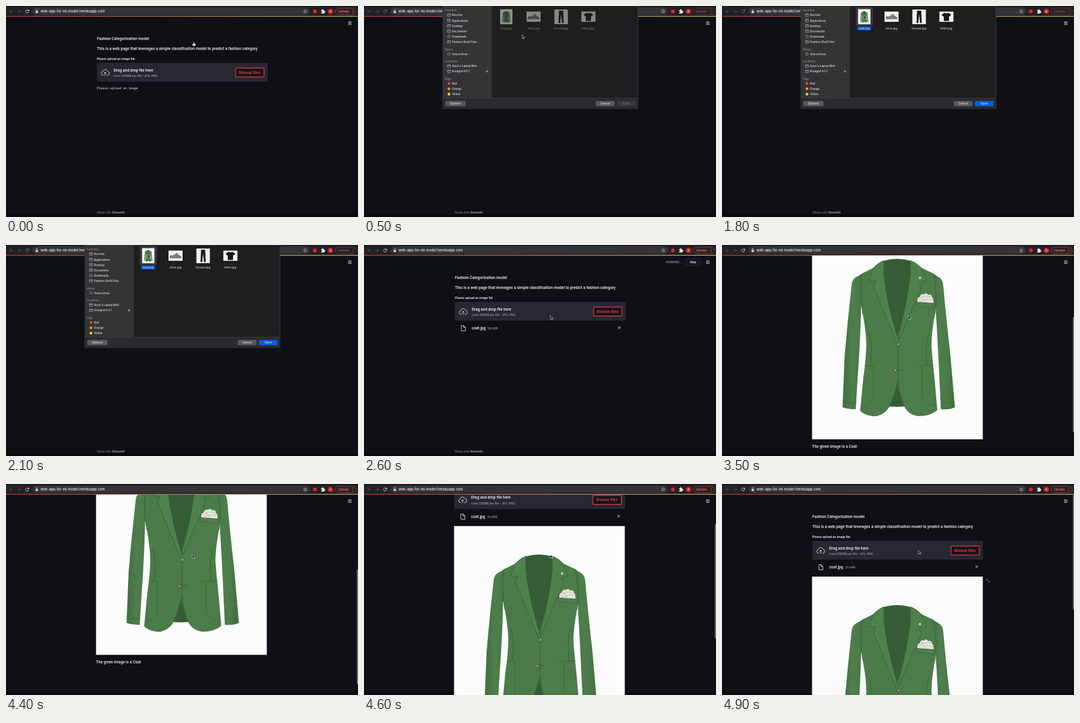
Animation, 600 px wide and 360 px high, one loop 5 s. Source, as an HTML page:

```html
<!DOCTYPE html>
<html lang="en">
<head>
<meta charset="utf-8">
<title>Fashion Categorization model</title>
<style>
html, body { margin: 0; width: 100%; height: 100%; overflow: hidden; background: #0e1016; }
svg { display: block; width: 600px; height: 360px; }
text { fill: #f6f6f8; font: 500 6.65px Roboto, "Liberation Sans", sans-serif; white-space: pre; }
.small { font-size: 5.25px; }
.grey { fill: #8f9097; }
.ui text { font: 500 4.6px Inter, sans-serif; fill: #e6e6e8; }
.ui .head { fill: #8d8d90; }
.ui .name { font-size: 5px; font-weight: 400; text-anchor: middle; }
.ui .mid { text-anchor: middle; font-size: 5px; }
.line { fill: none; stroke: #dedee2; stroke-width: .9; }
.seam { fill: none; stroke: #2f5632; stroke-width: .7; }
.stitch { fill: none; stroke: #2d5430; stroke-width: .8; stroke-dasharray: 1.2 .9; }
</style>
</head>
<body>
<svg viewBox="0 0 600 360">
<defs>
  <linearGradient id="rule"><stop stop-color="#c23c40"/><stop offset="1" stop-color="#c4b866"/></linearGradient>
  <linearGradient id="cloth"><stop stop-color="#416e40"/><stop offset=".4" stop-color="#4d7e4b"/><stop offset=".7" stop-color="#4a7b48"/><stop offset="1" stop-color="#406c3f"/></linearGradient>
  <g id="coat">
    <path fill="#fdfcfd" d="M153.500-25h291v356.500h-291z"/>
    <path fill="#365c38" d="M275 27Q298 20 322 27L328 70 308 150 313 275Q298 277 282 275L290 150 272 60z"/>
    <path class="seam" d="M302 33V150M301 236V274M276 32Q298 27 321 32"/>
    <path fill="url(#cloth)" d="M242 47L227 56Q222 59 221 68Q214 130 209 190L205.500 277Q216 281 228 280L231 230Q236 160 237 105L246 80z"/>
    <path fill="url(#cloth)" d="M357 47L371 56Q376 59 377 68Q382 125 389 185L397 277Q386 282 373 280L370 215Q367 150 364 105L354 80z"/>
    <path fill="#4a7b48" d="M276 26Q266 30 258 39L238 49Q234 90 240 118Q246 150 246 172Q245 200 241 225L235.500 283Q246 293 264 292Q279 288 286 275Q294 257 300 230V162Q279 95 276 50z"/>
    <path fill="#4b7c49" d="M321 26Q332 30 340 39L361 49Q367 90 363 118Q357 150 357 172Q359 200 362 225L367 282Q355 292 335 292Q318 290 311 276Q303 260 298 230V162Q317 95 321 50z"/>
    <path fill="#4f814c" d="M276 26Q266 30 259 38L250 60 262 61 258 70 297 165 300 160Q280 95 276 50z"/>
    <path fill="#4e804b" d="M321 26Q332 30 339 39L348 61 336 63 340 72 300 165 298 159Q317 95 321 50z"/>
    <path class="seam" d="M259 38L250 60 262 61 258 70 297 165M339 39L348 61 336 63 340 72 300 165M276 27V50Q280 95 300 161M321 27V50Q317 95 299 161M300 165V230Q294 257 286 275M300 230Q303 260 311 276M238 50Q234 88 240 118M361 50Q367 88 363 118M250 148Q258 180 252 206M352 148Q345 180 350 206"/>
    <path class="stitch" d="M243 206H258V255Q258 272 238 274M361 205L330 206M341 207V255Q342 272 365 274M227 56Q236 54 241 48M372 57Q363 54 358 48M206 268L228 271M373 271L396 268M331 98L361 106"/>
    <path fill="#507f4c" stroke="#31573a" stroke-width=".5" d="M331 97L361 100V107.500L331 103z"/>
    <path fill="#e6e5de" d="M333 97Q332 89 337 89Q338 83 344 84Q349 80 351 85Q357 83 358 89Q361 92 360.500 99z"/>
    <path fill="none" stroke="#8d9184" stroke-width="1" stroke-dasharray="1.400 1.300" d="M335 94Q345 85 357 89M338 97Q348 90 359 94M340 88l9 10"/>
    <circle cx="337.500" cy="56" r="1.8" fill="#e6e6e4"/>
    <g fill="#99968f" stroke="#3b3f3a" stroke-width=".9"><circle cx="301" cy="169.300" r="2.600"/><circle cx="295.500" cy="213.800" r="2.500"/></g>
    <path class="seam" d="M299 213h10"/>
  </g>
</defs>

<rect width="600" height="360" fill="#0e1016"/>
<rect y="356" width="600" height="4" fill="#090a0e"/>

<g id="page">
  <text x="155" y="58.200">Fashion Categorization model</text>
  <text x="155" y="75.200">This is a web page that leverages a simple classification model to predict a fashion category</text>
  <text class="small" x="155" y="92.400">Please upload an image file</text>
  <rect x="155" y="97" width="291" height="32" rx="2" fill="#262730"/>
  <g class="line" stroke-linecap="round"><path d="M166 118h-1a3 3 0 0 1-.3-5.900a4.500 4.500 0 0 1 8.600-.8a3.500 3.500 0 0 1 .7 6.700h-2"/><path d="M169 118.500v-5.500m-2 2l2-2 2 2"/></g>
  <text x="183.500" y="111.500">Drag and drop file here</text>
  <text class="small grey" x="183.500" y="121">Limit 200MB per file • JPG, PNG</text>
  <rect x="391" y="105.500" width="49" height="16" rx="2" fill="#17131a" stroke="#8f2c3b" stroke-width="1.600"/>
  <rect x="391.600" y="106.100" width="47.800" height="14.800" rx="1.500" fill="none" stroke="#e8404c" stroke-width=".7"/>
  <text x="397" y="115.800" style="fill:#e2414c">Browse files</text>
  <text id="hint" x="155" y="141.600" style="font:5.3px 'Noto Sans Mono',monospace">Please upload an image</text>
  <g id="file">
    <path class="line" d="M166 137.500h4l3 3v6h-7zM169.800 137.500v3.200h3.200"/>
    <text x="183.500" y="143.900">coat.jpg</text>
    <text class="small grey" x="211" y="143.900">26.6KB</text>
    <path class="line" d="M433 139l4.400 4.400m0-4.400l-4.400 4.400"/>
  </g>
  <g id="result">
    <use href="#coat" x="1" y="183"/>
    <text x="154.500" y="528.700">The given image is a Coat</text>
  </g>
  <path id="expand" d="M451.500 164.500v-2.500h2.500M451.500 162l2.300 2.300M457 164.500v2.500h-2.500M457 167l-2.300-2.300" fill="none" stroke="#77787e" stroke-width=".8"/>
  <text id="foot" class="small" x="155" style="fill:#686a72">Made with <tspan font-weight="bold" fill="#93959c">Streamlit</tspan></text>
</g>

<path d="M583 27h6m-6 2.200h6m-6 2.200h6" stroke="#e4e4e6" stroke-width=".9"/>
<g id="running">
  <text class="small grey" x="515" y="31.300">RUNNING...</text>
  <rect x="548" y="23" width="26" height="12" rx="1.500" fill="#14161d" stroke="#343640" stroke-width=".6"/>
  <text class="small" x="555.500" y="31">Stop</text>
</g>
<rect id="thumb" x="598" width="2" height="196" rx="1" fill="#6a6b70"/>

<g class="ui">
  <rect width="600" height="17" fill="#222125"/>
  <rect width="600" height="1" fill="#0a090b"/>
  <rect x="45" y="2.500" width="473" height="13" rx="6.500" fill="#343338"/>
  <rect y="17" width="600" height="1.200" fill="url(#rule)"/>
  <path class="line" d="M12 9.200H6.500m2.500-2.500l-2.500 2.500 2.500 2.500M19.500 9.200H25m-2.500-2.500l2.500 2.500-2.500 2.500" style="stroke:#5b5b60;stroke-width:.8"/>
  <g id="reload"><path class="line" d="M38.300 8a2.600 2.600 0 1 0 .2 2.200"/><path d="M39.300 5.800v3h-3z" fill="#dedee2"/></g>
  <rect x="50.500" y="8.400" width="4" height="3.600" rx=".5" fill="#d5d5d8"/>
  <path class="line" d="M51.300 8.500v-1.200a1.200 1.200 0 0 1 2.400 0v1.200" style="stroke-width:.7"/>
  <text x="59" y="11.400" style="font-size:5.8px;fill:#f2f2f4">web-app-for-ml-model.herokuapp.com</text>
  <path class="line" d="M510 6.200l.9 2 2.100.2-1.600 1.400.5 2.100-1.900-1.100-1.900 1.100.5-2.100-1.600-1.400 2.100-.2z" style="stroke-width:.6"/>
  <circle cx="526.500" cy="9.200" r="3.200" fill="#e3222b"/>
  <path fill="#e8e8ea" d="M537 7.200h1.800a1.200 1.200 0 1 1 2.200 0h1.700v1.900a1.100 1.100 0 1 1 0 2v1.600h-5.700v-1.700a1.100 1.100 0 1 0 0-2z"/>
  <circle cx="553" cy="9.300" r="4.500" fill="#d51f26"/>
  <text x="553" y="11.100" class="mid">A</text>
  <g id="update">
    <rect x="561" y="3.800" width="36" height="11" rx="5.500" fill="#2d2024" stroke="#a94a4c" stroke-width=".7"/>
    <text x="566" y="11.300" style="fill:#f07f7a;font-size:5.4px">Update</text>
    <g fill="#f07f7a"><circle cx="591.500" cy="6.800" r=".6"/><circle cx="591.500" cy="9.300" r=".6"/><circle cx="591.500" cy="11.800" r=".6"/></g>
  </g>
</g>

<g id="dialog" class="ui">
  <rect x="134.300" y="-2" width="332.700" height="177" fill="#1e1d1f" stroke="#4b4b4e" stroke-width=".7"/>
  <rect x="134.600" width="82.400" height="157" fill="#343336"/>
  <rect x="134.600" y="157" width="332" height="17.600" fill="#2b2a2c"/>
  <path d="M134.600 157.200h332M217.200 0v157" stroke="#454447" stroke-width=".6"/>
  <g id="sidebar"></g>
  <path d="M207.500 111.600h4l-2-2.400zM207.500 112.200h4v.8h-4z" fill="#aaaaad"/>
  <rect x="138.500" y="162" width="34.500" height="9" rx="1.500" fill="#59585b"/>
  <text class="mid" x="155.700" y="168.300">Options</text>
  <rect x="395" y="162" width="32" height="9" rx="1.500" fill="#59585b"/>
  <text class="mid" x="411" y="168.300">Cancel</text>
  <rect id="open" x="431" y="162" width="32" height="9" rx="1.500"/>
  <text id="openText" class="mid" x="447" y="168.300">Open</text>
  <g id="picked">
    <rect x="228" y="2" width="29" height="32" rx="1.500" fill="#39383b"/>
    <rect x="230.500" y="34.800" width="23.500" height="6.700" rx="1" fill="#0b5bd7"/>
  </g>
  <g id="files">
    <use href="#coat" transform="translate(220.900 7.200) scale(.0722)"/>
    <rect x="277" y="9.500" width="24" height="17.500" fill="#f2f1f1"/>
    <path d="M279 20Q280 16 282 18Q287 18 291 13L294 16 299 20Q300 23 297 23H280Q278 22 279 20z" fill="#77797a"/>
    <path d="M279.500 22.500h19.500M287 18l3 2M290 15l3 2" stroke="#bcbdbd" stroke-width=".7"/>
    <rect x="324.500" y="6" width="23" height="25" fill="#f2f1f1"/>
    <path d="M332.500 8h7l1 21h-3L336 14 334.500 29h-3z" fill="#17181d"/>
    <rect x="370.500" y="9.500" width="24" height="17.500" fill="#f2f1f1"/>
    <path d="M379.500 11.500Q382.500 13.500 385.500 11.500L390.500 14.500 388.500 18 387 17V25.500H378V17L376.500 18 374.500 14.500z" fill="#17171a"/>
    <text class="name" x="242" y="39.700">coat.jpg</text>
    <text class="name" x="289" y="39.700">shoe.jpg</text>
    <text class="name" x="335.800" y="39.700">trouser.jpg</text>
    <text class="name" x="382.300" y="39.700">tshirt.jpg</text>
  </g>
</g>

<path id="arrow" d="M0 0V6.200L1.500 4.900 2.500 7.100 3.600 6.600 2.600 4.500H4.500z" fill="#08080a" stroke="#e8e8ea" stroke-width=".6"/>
<path id="hand" d="M-.8 0Q0-.8.7 0V2.400L3 3Q3.500 3.300 3.300 4.300L2.700 6.500H-1.200L-3 3.900Q-2.400 3-.8 4z" fill="#f2f2f2" stroke="#18181b" stroke-width=".4"/>
</svg>
<script>
const $ = id => document.getElementById(id);
const set = (id, name, value) => $(id).setAttribute(name, value);
const show = (id, on) => set(id, "visibility", on ? "visible" : "hidden");

// Sidebar rows: label, baseline, kind of icon
const rows = [
  ["Favorites", 9, "head"], ["Recents", 17.3, "box"], ["Applications", 26.5, "box"],
  ["Desktop", 35.6, "box"], ["Documents", 44.7, "box"], ["Downloads", 53.9, "dot"],
  ["Painters Shelf Files", 63, "box"], ["Velora", 75.7, "head"], ["Velora Drive", 83.7, "dot"],
  ["Locations", 96.2, "head"], ["Arjun's Laptop Mini", 104.2, "box"], ["Knotgrid 4.0.1", 113.4, "box"],
  ["Tags", 125.8, "head"], ["Red", 133.9, "#f2453d"], ["Orange", 143, "#f39a2b"], ["Yellow", 152.2, "#f3d233"]
];
const icon = (kind, y) =>
  kind == "head" ? "" :
  kind == "box" ? `<path d="M142.300 ${y - 3.9}h5v4.200h-5zm0 1.300h5" fill="none" stroke="#a3a3a7" stroke-width=".8"/>` :
  kind == "dot" ? `<circle cx="144.800" cy="${y - 1.8}" r="2.200" fill="none" stroke="#a3a3a7" stroke-width=".8"/>` :
  `<circle cx="144.800" cy="${y - 1.8}" r="2.300" fill="${kind}"/>`;
$("sidebar").innerHTML = rows.map(([label, y, kind]) =>
  `${icon(kind, y)}<text class="${kind == "head" ? "head" : ""}" x="${kind == "head" ? 137.5 : 150}" y="${y}">${label}</text>`).join("");

// Value at time t between keys [time, value, ...]
function at(keys, t) {
  const i = keys.findIndex(k => k[0] > t);
  if (i < 0) return keys[keys.length - 1].slice(1);
  const a = keys[i - 1], b = keys[i], p = (t - a[0]) / (b[0] - a[0]);
  return a.slice(1).map((v, n) => v + (b[n + 1] - v) * p);
}
const pointer = [[0, 320, 61.5], [200, 320, 61.5], [500, 269.5, 49], [1100, 242, 16],
  [2100, 242, 16], [2500, 317.7, 120.5], [4800, 317.7, 120.5], [4900, 334.7, 113]];
const scroll = [[0, 0], [3200, 0], [3300, 40], [3500, 183], [3600, 255],
  [4200, 255], [4300, 249], [4400, 223], [4700, 18], [4800, 0]];

function draw(now) {
  const t = Math.floor(now % 5000 / 100) * 100;
  const dialog = t >= 200 && t < 2200, picked = dialog && t >= 1500;
  const done = t >= 2800, hand = t < 200;
  const [x, y] = at(pointer, t), [top] = at(scroll, t);

  set("page", "transform", `translate(${done ? -1 : 0} ${-top})`);
  set("foot", "y", done ? 609 : 354);
  set("thumb", "y", 18.5 + top / 1.75);
  show("thumb", done);
  show("result", done);
  show("expand", t >= 4900);
  show("file", t >= 2400);
  show("hint", t < 2400);
  show("running", t >= 2400 && t < 2900);

  show("dialog", dialog);
  show("picked", picked);
  set("files", "opacity", at([[0, .5], [700, .5], [1000, 1]], t)[0]);
  set("open", "fill", picked ? "#0b5bd7" : "#39383b");
  set("openText", "opacity", picked ? 1 : .35);
  set("reload", "opacity", dialog ? .45 : 1);
  set("update", "opacity", dialog ? .6 : 1);

  show("hand", hand);
  show("arrow", !hand);
  set(hand ? "hand" : "arrow", "transform", `translate(${x} ${y})`);
  requestAnimationFrame(draw);
}
draw(0);
</script>
</body>
</html>
```
